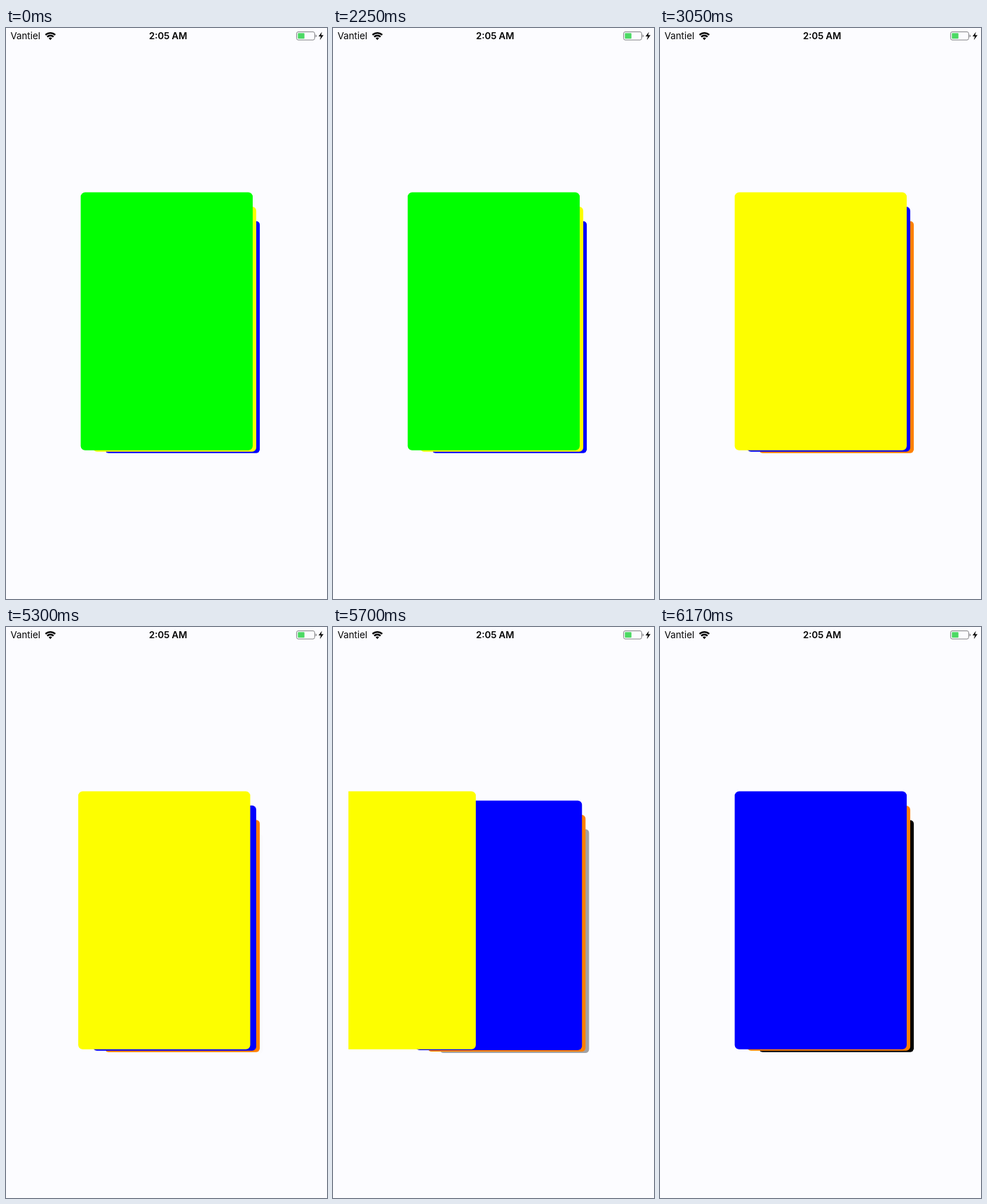
An HTML page for the animation above (8 s loop, 458x815 px).

```html
<!DOCTYPE html>
<html lang="en">
<head>
<meta charset="utf-8">
<title>Card stack</title>
<style>
html, body { margin: 0; width: 100%; height: 100%; overflow: hidden; background: #fcfcff; }
svg { display: block; width: 100vw; height: 100vh; }
text { font: 400 13.27px Inter, sans-serif; }
.time { font-weight: 600; text-anchor: middle; }
</style>
</head>
<body>
<svg viewBox="0 0 458 815">
  <defs>
    <clipPath id="page"><rect x="22" y="0" width="414" height="815"/></clipPath>
  </defs>
  <rect width="458" height="815" fill="#fcfcff"/>
  <g id="stack" clip-path="url(#page)"></g>
  <text x="6.6" y="16.4">Vantiel</text>
  <g fill="none" stroke="#000" stroke-width="2.3">
    <path d="M56.4 9.9a9.8 9.8 0 0 1 13.8 0"/>
    <path d="M58.8 12.6a6.4 6.4 0 0 1 9 0"/>
  </g>
  <path d="M63.3 17.2l-2.4-2.6a3.4 3.4 0 0 1 4.8 0z"/>
  <text class="time" x="231.2" y="16.4">2:05 AM</text>
  <rect x="414.6" y="5.5" width="25.8" height="11.6" rx="2.4" fill="none" stroke="#858588"/>
  <path d="M441.6 9.2q1.6 .5 1.6 2.1t-1.6 2.1z" fill="#858588"/>
  <rect x="416.4" y="7.3" width="9.4" height="8" rx=".8" fill="#4cd964"/>
  <path d="M450.8 5.6l-4.8 6.5h3.2l-1.4 5.2 5.2-7h-3.4z"/>
</svg>
<script>
const LOOP = 8000;
const TICK = 10;    // clock resolution in ms
const CARD = { w: 245.4, h: 368.2, cx: 229.3, cy: 418.7, r: 6.2 };
const PAGE = 414;   // distance one swipe travels
const STEP = 11.2;  // centre offset per depth level
const SHRINK = 0.05;
const COLORS = ['#00ff00', '#fdfe00', '#0000ff', '#ff8000', '#000000'];

// Each swipe: a drag up to the release, then a settling glide.
const SWIPES = [
  { start: 2250, release: 2510, end: 3050, from: 0, at: 0.329, speed: 0.0026 },
  { start: 5300, release: 5700, end: 6160, from: 0.0085, at: 0.358, speed: 0.0025 }
];

const stack = document.getElementById('stack');
const cards = COLORS.map(fill => {
  const el = document.createElementNS('http://www.w3.org/2000/svg', 'rect');
  el.setAttribute('fill', fill);
  stack.prepend(el);
  return el;
});

function hermite(t, t0, t1, p0, p1, v0, v1) {
  const d = t1 - t0, u = (t - t0) / d, w = 1 - u;
  return w * w * ((1 + 2 * u) * p0 + u * d * v0)
       + u * u * ((3 - 2 * u) * p1 - w * d * v1);
}

function progress(s, t) {
  if (t < s.start) return 0;
  if (t >= s.end) return 1;
  return t < s.release
    ? hermite(t, s.start, s.release, s.from, s.at, 0, s.speed)
    : hermite(t, s.release, s.end, s.at, 1, s.speed, 0);
}

function place(el, depth) {
  const back = Math.max(depth, 0);
  const k = 1 - SHRINK * back;
  const w = CARD.w * k, h = CARD.h * k;
  const cx = CARD.cx + STEP * back + PAGE * Math.min(depth, 0);
  const cy = CARD.cy + STEP * back;
  const attrs = {
    x: cx - w / 2, y: cy - h / 2, width: w, height: h, rx: CARD.r * k,
    opacity: Math.min(1, Math.max(0, 3 - depth))
  };
  for (const name in attrs) el.setAttribute(name, attrs[name].toFixed(3));
}

function draw(t) {
  const pos = SWIPES.reduce((sum, s) => sum + progress(s, t), 0);
  cards.forEach((el, i) => place(el, i - pos));
}

const begin = performance.now();
function tick() {
  const t = (performance.now() - begin) % LOOP;
  draw(Math.floor(t / TICK) * TICK);
  requestAnimationFrame(tick);
}
tick();
</script>
</body>
</html>
```
